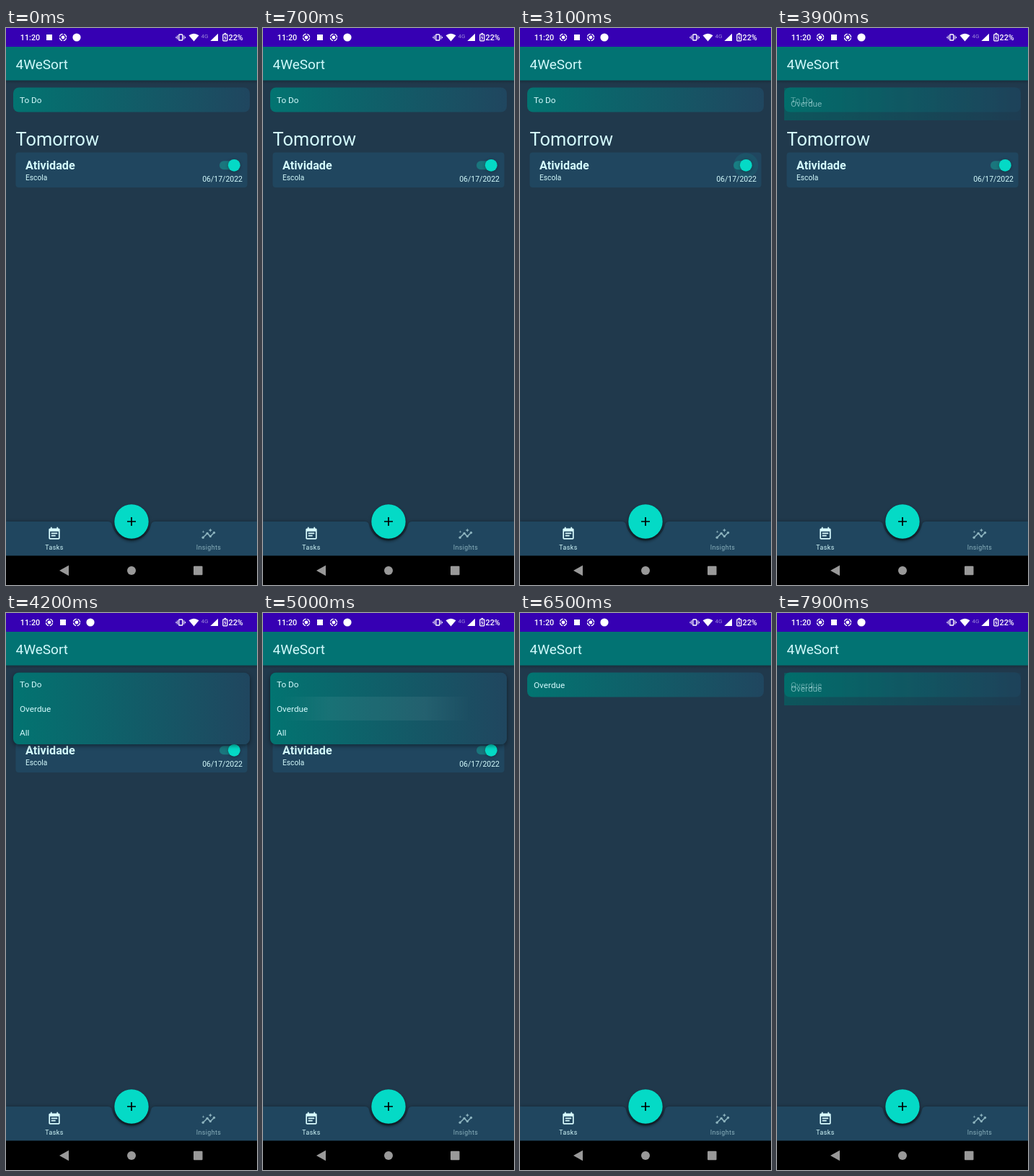
Recreate the animation shown at these times as an HTML page. Size 348x772 px, loop 8 s.

```html
<!DOCTYPE html>
<html lang="en">
<head>
<meta charset="utf-8">
<title>Task list</title>
<style>
  html, body { margin: 0; width: 100%; height: 100%; overflow: hidden; background: #20394c; }
  body { position: relative; font-family: Roboto, sans-serif; }
  svg { position: absolute; left: 0; top: 0; width: 348px; height: 772px; display: block; }
  text { fill: #d3fafc; }
  .status text { fill: #fff; font-size: 10.8px; font-weight: 500; }
  .heading { font-size: 25.4px; }
  .task { font-size: 16.2px; font-weight: 700; }
  .detail { font-size: 10.2px; }
  .date { font-size: 10.5px; text-anchor: end; }
  .option { font-size: 11.8px; }
  .tab { font-size: 8.8px; letter-spacing: .45px; text-anchor: middle; }
  .white { fill: #fff; }
  .line { fill: none; stroke: #fff; }

  /* one loop = 8 s, so 1.25% = 100 ms */
  .shift, .newIcon { animation: shift 8s cubic-bezier(.3, 0, .3, 1) infinite; }
  .newIcon { animation-name: appear; transform-origin: 60px 13px; }
  .todo, .overdue, .overdueTask, .thumb, .knob, .track, .ripple, .popup, .press {
    animation: 8s step-end infinite;
  }
  .todo { animation-name: todo; }
  .overdue { animation-name: overdue; }
  .overdueTask { animation-name: overdueTask; }
  .thumb { animation-name: thumb; }
  .knob { animation-name: knob; }
  .track { animation-name: track; }
  .ripple { animation-name: ripple; }

  @keyframes shift {
    0%, 1% { transform: none; }
    7.5%, 100% { transform: translateX(19px); }
  }
  @keyframes appear {
    0%, 1.2% { opacity: 0; transform: scale(0); }
    8.75%, 100% { opacity: 1; transform: none; }
  }
  @keyframes todo { 0% { visibility: visible; } 66.25%, 100% { visibility: hidden; } }
  @keyframes overdue { 0% { visibility: hidden; } 66.25%, 100% { visibility: visible; } }
  @keyframes overdueTask {
    0%, 81.25%, 100% { visibility: hidden; }
    66.25% { visibility: visible; }
  }
  @keyframes thumb {
    0%, 40%, 100% { transform: none; }
    21.25% { transform: translateX(-2px); }
    22.5% { transform: translateX(-9px); }
    23.75% { transform: translateX(-15px); }
    25% { transform: translateX(-16.8px); }
    37.5% { transform: translateX(-12px); }
    38.75% { transform: translateX(-3px); }
  }
  @keyframes knob {
    0%, 38.75%, 100% { fill: #04dac6; }
    22.5%, 37.5% { fill: #5ec6be; }
    23.75% { fill: #b9b5b5; }
  }
  @keyframes track {
    0%, 38.75%, 100% { fill: #1a767d; }
    22.5%, 37.5% { fill: #3d7886; }
    23.75% { fill: #577689; }
  }
  @keyframes ripple {
    0%, 25%, 40%, 100% { opacity: 0; }
    21.25%, 37.5% { opacity: .16; }
    23.75%, 38.75% { opacity: .09; }
  }

  .popup {
    --shadow: 0 2px 6px #0007;
    position: absolute; left: 10px; top: 82.5px; width: 328px;
    display: flex; align-items: center; overflow: hidden;
    color: #d3fafc; background: linear-gradient(90deg, #027471, #20465f);
    animation-name: popup;
  }
  .rows { flex: none; width: 100%; }
  .rows div { position: relative; height: 33.2px; line-height: 35px; padding-left: 9px; }
  .press {
    position: absolute; left: 15px; top: 0; width: 264px; height: 33px;
    background: linear-gradient(90deg, #fff0, #fff 25%, #fff 75%, #fff0); animation-name: press;
  }
  @keyframes popup {
    0%, 66.25% { opacity: 0; }
    48.75%, 98.75%, 100% { opacity: .6; height: 45px; border-radius: 0; box-shadow: none; filter: brightness(.92); }
    50% { opacity: .85; height: 75px; border-radius: 0; box-shadow: none; filter: none; }
    51.25% { opacity: 1; height: 93px; border-radius: 8px; box-shadow: var(--shadow); filter: none; }
    52.5% { opacity: 1; height: 99.5px; border-radius: 8px; box-shadow: var(--shadow); filter: none; }
  }
  @keyframes press {
    0%, 66.25%, 100% { opacity: 0; }
    61.25% { opacity: .03; }
    62.5% { opacity: .06; }
  }
</style>
</head>
<body>
<svg viewBox="0 0 348 772">
  <defs>
    <linearGradient id="field" gradientUnits="userSpaceOnUse" x1="10" x2="338" y1="0" y2="0">
      <stop stop-color="#027471"/><stop offset="1" stop-color="#20465f"/>
    </linearGradient>
    <linearGradient id="drop" x2="0" y2="1">
      <stop stop-color="#000" stop-opacity=".22"/><stop offset="1" stop-opacity="0"/>
    </linearGradient>
    <filter id="soft" x="-50%" y="-50%" width="200%" height="200%"><feGaussianBlur stdDeviation="2"/></filter>
    <g id="record">
      <circle r="4.6" class="line" stroke-width="1.3" stroke-dasharray="5.6 1.63" stroke-dashoffset="-.8"/>
      <circle r="2.4" class="white"/>
    </g>
    <rect id="card" x="13.5" y="172.5" width="321" height="48.5" rx="4" fill="#20465f"/>
    <rect id="slot" x="296" y="184.3" width="23" height="12" rx="6"/>
    <circle id="knob" cx="316.3" cy="190.3" r="8.4"/>
    <path id="bar" d="M0 684H141Q146 684 147 688.5A27.6 27.6 0 0 0 201 688.5Q202 684 207 684H348V732H0Z"/>
  </defs>

  <rect width="348" height="772" fill="#20394c"/>
  <rect y="72" width="348" height="5.5" fill="url(#drop)"/>
  <rect y="26" width="348" height="46.6" fill="#027373"/>
  <text x="13.5" y="56.5" font-size="19">4WeSort</text>

  <rect width="348" height="26" fill="#3600b3"/>
  <g class="status">
    <text x="19.8" y="17.3">11:20</text>
    <g class="newIcon"><use href="#record" x="60" y="13"/></g>
    <g class="shift">
      <rect x="56" y="9" width="8" height="8" class="white"/>
      <use href="#record" x="79" y="13"/>
      <circle cx="98" cy="13" r="5.6" class="white"/>
    </g>
    <rect x="239.7" y="9" width="5" height="8" rx=".8" class="line" stroke-width="1.4"/>
    <path d="M237.6 10.3v5.4M246.8 10.3v5.4M235.9 12v2.2M248.5 12v2.2" class="line"/>
    <path d="M253.5 10.2Q260.5 5.2 267.5 10.2L260.5 18.5Z" class="white"/>
    <text x="270.5" y="13.5" style="font-size:8px;font-weight:400;fill:#9a85d9">4G</text>
    <path d="M294 7.7V18H283.3Z" class="white"/>
    <path d="M302.5 7.6h2.6" class="line" stroke-width="1.4"/>
    <rect x="300.8" y="8.9" width="6" height="9" rx=".8" class="line" stroke-width="1.3"/>
    <path d="M304.2 10.5l-1.2 3h1.8l-1.2 3" class="line"/>
    <text x="308.5" y="17.3">22%</text>
  </g>

  <rect x="10" y="82.5" width="328" height="34" rx="8" fill="url(#field)"/>
  <text class="option todo" x="19" y="104.2">To Do</text>
  <text class="option overdue" x="19" y="104.2">Overdue</text>

  <g class="todo">
    <text class="heading" x="13.5" y="163.3">Tomorrow</text>
    <use href="#card"/>
    <text class="task" x="27" y="195.7">Atividade</text>
    <text class="detail" x="27" y="211.4">Escola</text>
    <text class="date" x="328" y="213">06/17/2022</text>
    <use href="#slot" class="track"/>
    <g class="thumb">
      <circle class="ripple" cx="316.3" cy="190.3" r="17" fill="#04dac6"/>
      <use href="#knob" y=".8" fill="#0005" filter="url(#soft)"/>
      <use href="#knob" class="knob"/>
    </g>
  </g>

  <g class="overdueTask" transform="translate(0 -13.4)">
    <text class="heading" x="13.5" y="163.3">7 Days Ago</text>
    <use href="#card"/>
    <text class="task" x="27" y="195.7">Reunião</text>
    <text class="detail" x="27" y="211.4">Trabalho</text>
    <text class="date" x="328" y="213">06/15/2022</text>
    <use href="#slot" fill="#577689"/>
    <use href="#knob" x="-16.8" y=".8" fill="#0005" filter="url(#soft)"/>
    <use href="#knob" x="-16.8" fill="#b9b5b5"/>
  </g>

  <use href="#bar" fill="#0005" filter="url(#soft)"/>
  <use href="#bar" fill="#20465f"/>
  <circle cx="174" cy="687" r="24" fill="#0008" filter="url(#soft)"/>
  <circle cx="174" cy="684" r="23.7" fill="#04dac6"/>
  <path d="M168 684h12M174 678v12" stroke="#000" stroke-width="1.7"/>

  <path transform="translate(56.8 690.1) scale(.85)" fill="#d9fcff" fill-rule="evenodd"
    d="M19 4h-1V2h-2v2H8V2H6v2H5c-1.1 0-2 .9-2 2v14c0 1.1.9 2 2 2h14c1.1 0 2-.9 2-2V6c0-1.1-.9-2-2-2zM19 20H5V9h14zM7 11h10v2H7zM7 15h7v2H7z"/>
  <text class="tab" x="67" y="723.2">Tasks</text>
  <g transform="translate(270.6 691) scale(.85)" opacity=".6" fill="#d3fafc">
    <path d="M3 18L10 11L15 16L21 10" fill="none" stroke="#d3fafc" stroke-width="1.9"/>
    <circle cx="3" cy="18" r="2"/><circle cx="10" cy="11" r="2"/>
    <circle cx="15" cy="16" r="2"/><circle cx="21" cy="10" r="2"/>
    <path d="M15 9l.94-2.07L18 6l-2.06-.93L15 3l-.92 2.07L12 6l2.08.93zM3.5 11L4 9l2-.5L4 8l-.5-2L3 8l-2 .5L3 9z"/>
  </g>
  <text class="tab" x="281" y="723.2" opacity=".6">Insights</text>

  <rect y="731.4" width="348" height="41"/>
  <g fill="#999">
    <path d="M74 752L87 744.8V759.2Z"/>
    <circle cx="174" cy="752" r="6"/>
    <rect x="260" y="745.8" width="12.5" height="12.5" rx="1"/>
  </g>
</svg>
<div class="popup option">
  <div class="rows">
    <div>To Do</div>
    <div><span class="press"></span>Overdue</div>
    <div>All</div>
  </div>
</div>
</body>
</html>
```
